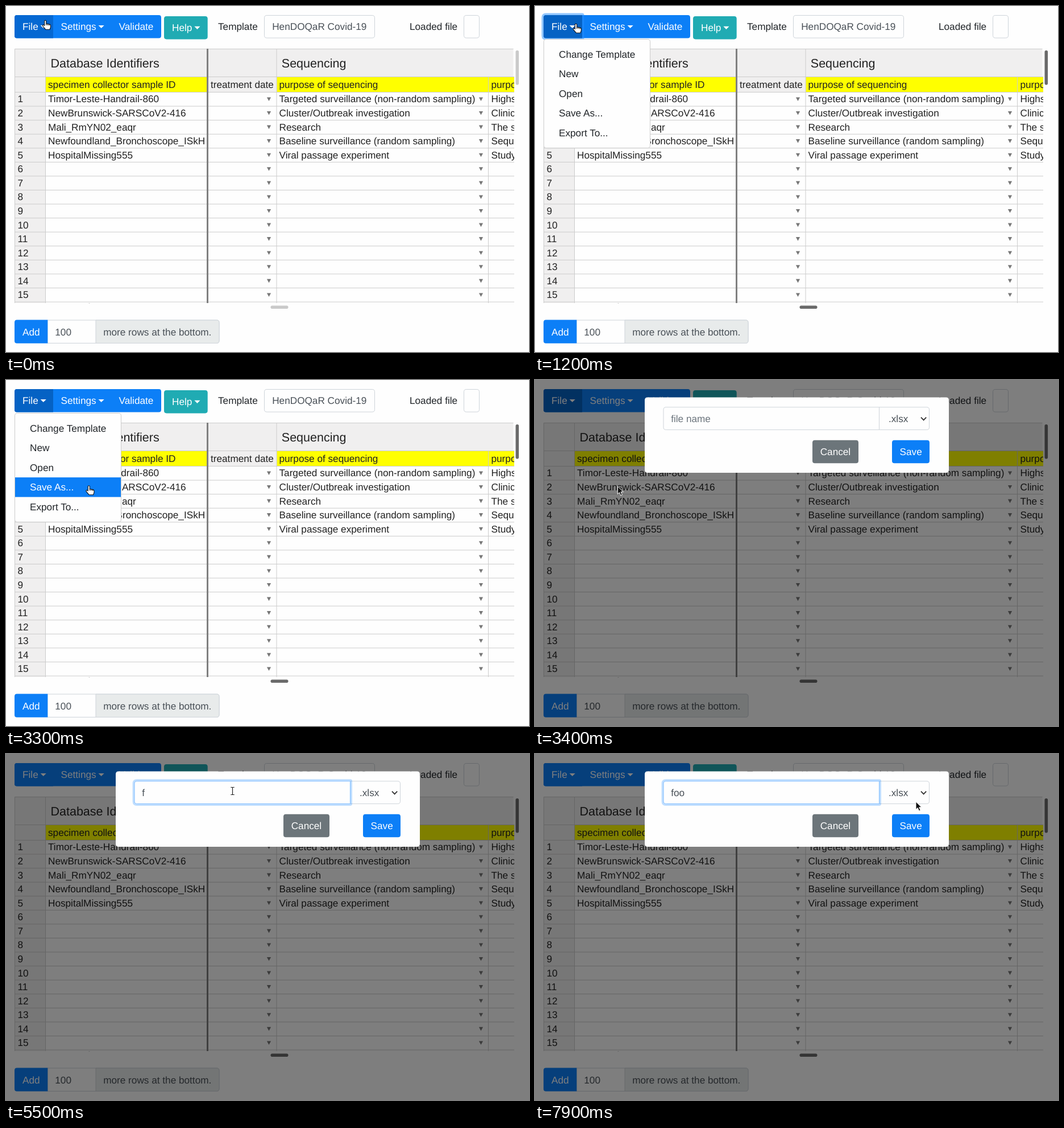
An HTML page for the animation above (8 s loop, 920x608 px).

```html
<!DOCTYPE html>
<html lang="en">
<head>
<meta charset="utf-8">
<title>Save a sample sheet</title>
<style>
html, body { margin: 0; width: 100%; height: 100%; overflow: hidden; background: #fefefe; }
svg { display: block; width: 920px; height: 608px; }
text { font: 17.2px "Liberation Sans", Arial, sans-serif; text-rendering: geometricPrecision; white-space: pre; }
text.big { font-size: 21.5px; }
</style>
</head>
<body>
<svg id="stage" viewBox="0 0 920 608"></svg>
<script>
const NS = 'http://www.w3.org/2000/svg';
const stage = document.getElementById('stage');
const INK = '#212529', GREY = '#495057', EDGE = '#ced4da', LINE = '#ccc';
const PAPER = '#fefefe', BLUE = '#0c7ff7', HEAD = '#f0efef', YELLOW = '#ffff00';

function add(parent, tag, attrs, content) {
  const el = document.createElementNS(NS, tag);
  for (const k in attrs) el.setAttribute(k, attrs[k]);
  if (content !== undefined) el.textContent = content;
  parent.appendChild(el);
  return el;
}
const group = (p, attrs = {}) => add(p, 'g', attrs);
const rect = (p, x, y, width, height, more) =>
  add(p, 'rect', { x, y, width, height, ...more });
const path = (p, d, attrs) => add(p, 'path', { d, ...attrs });
const text = (p, x, y, s, fill = INK, more) => add(p, 'text', { x, y, fill, ...more }, s);
const show = (el, on) => el.setAttribute('visibility', on ? 'visible' : 'hidden');

// Box with separate corner radii on its left and right side.
function box(p, x, y, w, h, l, r, attrs) {
  return path(p, `M${x + l} ${y}H${x + w - r}q${r} 0 ${r} ${r}V${y + h - r}q0 ${r} ${-r} ${r}` +
    `H${x + l}q${-l} 0 ${-l} ${-l}V${y + l}q0 ${-l} ${l} ${-l}z`, attrs);
}
const caret = (p, x, y) => path(p, `M${x} ${y}h10.2l-5.1 5.1z`, { fill: '#fff' });
const framed = (fill, stroke = EDGE) => ({ fill, stroke, 'stroke-width': 1 });
const halo = (stroke, opacity) =>
  ({ fill: 'none', stroke, 'stroke-opacity': opacity, 'stroke-width': 3.4 });

function clip(id, x, y, w, h) {
  rect(add(stage, 'clipPath', { id }), x, y, w, h);
  return { 'clip-path': `url(#${id})` };
}

// Toolbar
box(stage, 15, 16, 258, 40.6, 4.3, 4.3, { fill: BLUE });
const ring = box(stage, 13.3, 14.3, 71.4, 44, 6, 1.7, halo('#268fff', .5));
const fileBtn = box(stage, 15, 16, 68, 40.6, 4.3, 0, {});
text(stage, 29, 42.2, 'File', '#fff');
caret(stage, 60.6, 34);
text(stage, 96.5, 42.2, 'Settings', '#fff');
caret(stage, 162.5, 34);
text(stage, 198.5, 42.2, 'Validate', '#fff');
box(stage, 278, 18, 76.7, 40.4, 4.3, 4.3, { fill: '#20abb3' });
text(stage, 292, 44, 'Help', '#fff');
caret(stage, 331.3, 35.8);
text(stage, 373, 42.2, 'Template');
box(stage, 454.5, 16.5, 194, 39.6, 4.3, 4.3, framed(PAPER));
text(stage, 468.2, 42.2, 'HenDOQaR Covid-19', GREY);
text(stage, 710, 42.2, 'Loaded file');
box(stage, 805.5, 16.5, 27, 39.6, 4.3, 4.3, framed(PAPER));

// Table
const TOP = 151.5, ROW = 24.57;
const table = group(stage, clip('grid', 15, 75, 879, 447));
rect(table, 15, 75, 877.5, 49, { fill: HEAD });
rect(table, 15, 75, 54, 450, { fill: HEAD });
rect(table, 15, 124, 879, 27.5, { fill: HEAD });
rect(table, 70, 124.5, 283, 27, { fill: YELLOW });
rect(table, 476.5, 124.5, 418, 27, { fill: YELLOW });
let grid = 'M15.5 522V75.5H892.5M15.5 124.5H894M69.5 75V522M476 75V522M848.5 124V522';
for (let i = 0; i < 16; i++) grid += `M15 ${TOP + ROW * i}H894`;
path(table, grid, { fill: 'none', stroke: LINE });
rect(table, 353, 75, 3, 447, { fill: '#808080' });

text(table, 78.5, 107.7, 'Database Identifiers', '#222', { class: 'big' });
text(table, 484.8, 107.7, 'Sequencing', '#222', { class: 'big' });
text(table, 74, 143.6, 'specimen collector sample ID', '#222');
text(table, 360, 143.6, 'treatment date', '#222');
text(table, 480.5, 143.6, 'purpose of sequencing', '#222');
text(table, 853.5, 143.6, 'purpose', '#222');

const cells = [
  ['Timor-Leste-Handrail-860', 'Targeted surveillance (non-random sampling)', 'Highsp'],
  ['NewBrunswick-SARSCoV2-416', 'Cluster/Outbreak investigation', 'Clinical'],
  ['Mali_RmYN02_eaqr', 'Research', 'The se'],
  ['Newfoundland_Bronchoscope_ISkH', 'Baseline surveillance (random sampling)', 'Sequen'],
  ['HospitalMissing555', 'Viral passage experiment', 'Study']
];
const columns = [74, 480.5, 853.5];
for (let i = 0; i < 15; i++) {
  const y = 169.4 + ROW * i;
  text(table, 20.5, y, i + 1, '#222');
  (cells[i] || []).forEach((s, c) => text(table, columns[c], y, s, '#222'));
  for (const x of [462.5, 835.5])
    path(table, `M${x - 3.6} ${y - 9}h7.2l-3.6 6.6z`, { fill: '#777' });
}
rect(stage, 145.5, 522, 2, 1, { fill: LINE });

const thumbs = group(stage);
rect(thumbs, 896.5, 78, 5.6, 60.5, { rx: 2.8 });
rect(thumbs, 465.5, 526.4, 31, 5.6, { rx: 2.8 });

// Footer
box(stage, 73, 552, 302, 40.5, 0, 4.3, framed(PAPER));
box(stage, 158, 552, 217, 40.5, 0, 4.3, framed('#e8ebeb'));
box(stage, 15, 551.5, 58.3, 41.3, 4.3, 0, { fill: BLUE });
text(stage, 29, 578.5, 'Add', '#fff');
text(stage, 86.3, 578.5, '100', GREY);
text(stage, 171.2, 578.5, 'more rows at the bottom.', GREY);

// File menu
const MENU_Y = 67.8, ITEM = 34.45;
const menu = group(stage);
box(menu, 15.5, 58.5, 187, 191, 4.3, 4.3, framed(PAPER, LINE));
const hover = rect(menu, 16, 0, 186, ITEM);
const items = ['Change Template', 'New', 'Open', 'Save As...', 'Export To...']
  .map((s, i) => text(menu, 42, 90.8 + ITEM * i, s));

// Save dialog
const dialog = group(stage);
rect(dialog, 0, 0, 920, 608, { opacity: .5 });
box(dialog, 193, 30.5, 535, 132.5, 5, 5, { fill: PAPER });
box(dialog, 605.5, 47.8, 88, 39.6, 0, 4.3, framed(PAPER));
text(dialog, 622, 74, '.xlsx', GREY);
path(dialog, 'M679 65.6l4.6 4.8 4.6-4.8', { fill: 'none', stroke: '#333', 'stroke-width': 1.8 });
const glow = box(dialog, 224.3, 46, 383, 43.2, 6, 1.7, halo('#007bff', .25));
const field = box(dialog, 226, 47.8, 379.5, 39.6, 4.3, 0, framed(PAPER));
const entry = text(dialog, 239.2, 74, '');
const insertion = rect(dialog, 0, 58.5, 1, 19, { fill: '#333' });
box(dialog, 488, 105.8, 81, 40.4, 4.3, 4.3, { fill: '#6c757a' });
text(dialog, 501.7, 132, 'Cancel', '#fff');
box(dialog, 628, 105.8, 66, 40.4, 4.3, 4.3, { fill: BLUE });
text(dialog, 641.6, 132, 'Save', '#fff');

// Pointers, each drawn around its hot spot
const pointers = { hand: group(stage), arrow: group(stage), beam: group(stage) };
path(pointers.hand, 'M-1.8 9.4V1.4Q-1.8 .3-.3 .3 1.3 .3 1.3 1.5V6L7 7.1Q9 7.6 9 9.4V11.8' +
  'Q8.8 13.4 7.5 16.3H.2L-4.8 10.3Q-5.6 8.4-4 8z',
  { fill: '#fff', stroke: '#111', 'stroke-width': 1.1, 'stroke-linejoin': 'round' });
path(pointers.hand, 'M1.3 6v3M3.8 6.6v2.6M6.4 7.1v2.4', { stroke: '#111', 'stroke-width': 1 });
path(pointers.arrow, 'M.3 .8V14.6L3.5 11.6 5.8 17 8.4 15.9 6.1 10.7H10.4z',
  { fill: '#111', stroke: '#fff', 'stroke-width': 1 });
const beam = 'M-3.2-6.5H-1Q0-6.5 0-5.5 0-6.5 1-6.5H3.2M0-5.5V5.5M-3.2 6.5H-1Q0 6.5 0 5.5 0 6.5 1 6.5H3.2';
path(pointers.beam, beam, { fill: 'none', stroke: '#fff', 'stroke-width': 2.6 });
path(pointers.beam, beam, { fill: 'none', stroke: '#222', 'stroke-width': 1.2 });

// Pointer stops: time, x, y.
const stops = [
  [0, 69.5, 25], [400, 73.5, 34], [600, 72.3, 31],
  [1800, 82, 45], [1900, 130, 75], [2000, 160, 91],
  [2200, 118.5, 134], [2300, 113, 155], [2400, 122, 172], [2500, 138, 184], [2600, 146, 185.5],
  [3400, 145, 186], [3700, 152, 178], [3800, 200, 140], [3900, 275, 105], [4000, 345, 80],
  [4100, 392, 68], [4200, 418, 64], [4400, 405, 65], [4500, 398.5, 66], [5100, 398.5, 65],
  [7300, 460, 66], [7400, 555, 72], [7500, 628, 80], [7600, 661, 86], [7700, 669, 87], [7900, 669.7, 83]
];
const inField = (x, y) => x > 226 && x < 605 && y > 48 && y < 87;

function draw(t) {
  const [, x, y] = stops.filter(s => s[0] <= t).pop();
  const saving = t >= 3400, typed = t >= 5500;
  const open = t >= 1200 && !saving;

  thumbs.setAttribute('fill', t < 1000 ? '#cacaca' : '#6a6a6a');
  fileBtn.setAttribute('fill', t < 1100 ? '#0568d2' : t < 3700 ? '#0562c4' : BLUE);
  show(ring, t >= 1100 && t < 3300);

  show(menu, open);
  const row = Math.floor((y - MENU_Y) / ITEM);
  const pressed = t >= 3200;
  show(hover, open && row >= 0);
  hover.setAttribute('y', MENU_Y + ITEM * row);
  hover.setAttribute('fill', pressed ? BLUE : '#f6f9f9');
  items.forEach((el, i) => el.setAttribute('fill', pressed && i === row ? '#fff' : INK));

  show(dialog, saving);
  const focus = Math.max(0, Math.min(1, (Math.floor(t / 100) - 45) / 2));
  glow.setAttribute('opacity', focus);
  field.setAttribute('stroke', focus ? '#80bdff' : EDGE);
  entry.textContent = !typed ? 'file name' : t < 6000 ? 'f' : t < 6200 ? 'fo' : 'foo';
  entry.setAttribute('fill', typed ? GREY : '#6c757d');
  show(insertion, t >= 6000 && t < 6900);
  insertion.setAttribute('x', t < 6200 ? 254 : 263.5);

  const kind = !saving ? 'hand' : inField(x, y) ? 'beam' : 'arrow';
  for (const k in pointers) show(pointers[k], k === kind);
  pointers[kind].setAttribute('transform', `translate(${x} ${y})`);
}

const start = performance.now();
function tick() {
  draw((performance.now() - start) % 8000);
  requestAnimationFrame(tick);
}
tick();
</script>
</body>
</html>
```
